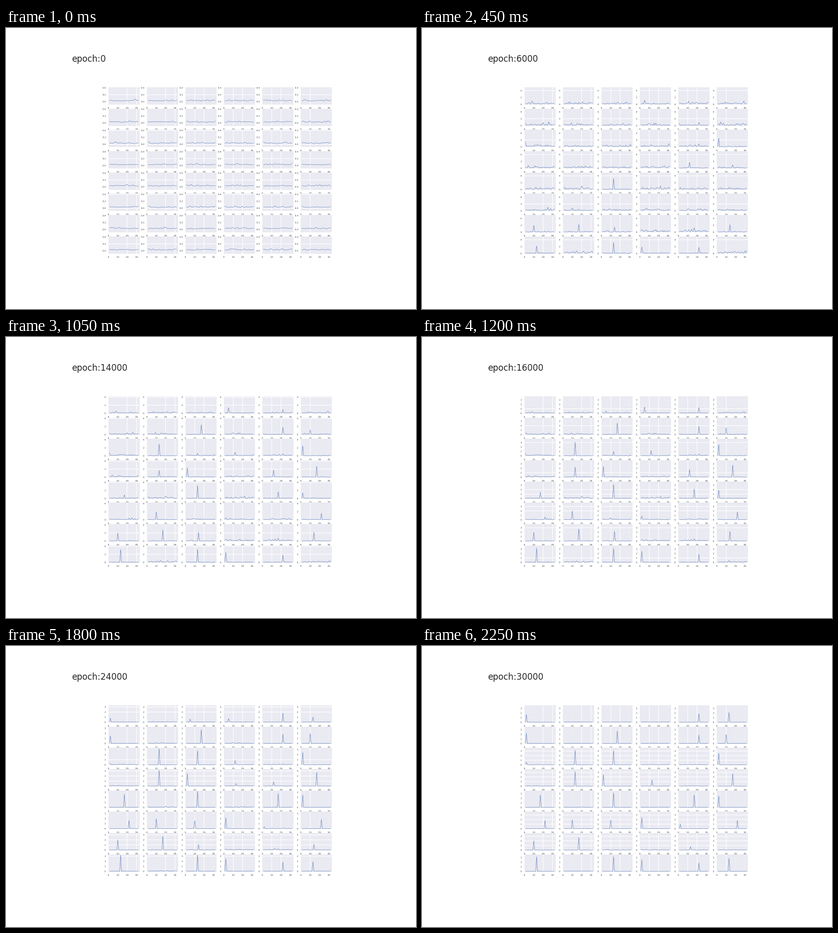
Recreate the animation shown at these times as a matplotlib script. Size 800 by 550 pixels, loop 2400 ms.

```python
import numpy as np
import matplotlib.pyplot as plt
from matplotlib.animation import FuncAnimation
from matplotlib.collections import LineCollection, PathCollection
from matplotlib.patches import Rectangle
from matplotlib.textpath import TextPath
from matplotlib.transforms import Affine2D

W, H, DPI = 800, 550, 100
ROWS, COLS, POINTS = 8, 6, 32
FRAMES, INTERVAL = 16, 150
INK, PANEL, BLUE = "#262626", "#EAEAF2", "#4C72B0"
PX = 72 / DPI

X0, DX, PW = 200, 75.07, 61
BOTTOM, DY, PH = 150, 41.7, 34
UNIT_X = 1.82
Y_MIN = -.088

# Position, height, first and last onset, panels in the order they rise
MODES = [
    (2, 2.5, 0, 18, (17, 45, 20, 29, 33, 6, 0, 34, 12)),
    (5, 1.4, 2, 9, (3, 2)),
    (10, 2.0, 0, 10, (36, 31, 11, 32)),
    (12, 1.75, 1, 7, (22, 15)),
    (13, 3.2, -2, 18, (26, 44, 42, 13, 19, 14, 47, 5, 21, 40)),
    (14, 2.2, 0, 2.5, (41, 38)),
    (17, 2.75, 2, 8, (37, 23, 8, 28, 24)),
    (22, 1.85, 1, 9, (46, 10, 35, 4, 30)),
]
FADING = (5, 12, 14)

rng = np.random.default_rng(5)
raw = rng.gamma(1.6, 1, (ROWS * COLS, POINTS + 1))
calm = .014 + .009 * (raw[:, 1:] + raw[:, :-1]) / 1.6
rough = .25 + .75 * rng.gamma(1.5, 1 / 1.5, (ROWS * COLS, POINTS))
xs = np.arange(1, POINTS + 1) * UNIT_X


def spikes(i):
    v = np.zeros((ROWS * COLS, POINTS))
    for x, height, first, last, panels in MODES:
        fade = np.clip((15 - i) / 6, 0, 1) if x in FADING else 1
        onsets = np.linspace(first, last, len(panels))
        width = .4 + .12 * np.maximum(onsets, 0)
        rise = 1 / (1 + np.exp((onsets - i) / width))
        v[list(panels), x - 1] = height * fade * rise * min(i / 3, 1)
    return v


def values(i):
    peak = spikes(i)
    level = np.interp(i, (0, 3, 5, 8, 10, 15), (0, .3, .28, .13, .08, .045))
    damp = 1 + .8 * peak.max(axis=1, keepdims=True)
    start = np.interp(i, (0, 2), (1, 0))
    return np.maximum(start * calm + level * rough / damp, peak)


def y_axis(i):
    """Pixels per unit and the tick values."""
    scale = np.interp(i, (0, 1, 3, 5, 8, 10, 12, 15),
                      (67.5, 13, 6.72, 6.37, 8.7, 10.25, 9.9, 9))
    step = .2 if scale > 30 else 1 if scale > 8.4 else 2
    return scale, np.arange(0, PH / scale + Y_MIN, step)


def corners():
    for n in range(ROWS * COLS):
        r, c = divmod(n, COLS)
        yield X0 + DX * c, BOTTOM + DY * r


def is_sharp(p):
    return abs(p % 1 - .5) <= .21


def grid_lines(scale, ticks):
    """Lines on a pixel's centre show; the others show only where they cross."""
    segs = []
    for left, base in corners():
        top = round(base - PH)
        cols = [left + t * UNIT_X for t in (10, 20, 30)]
        rows = [base - (t - Y_MIN) * scale for t in ticks]
        rows = [y for y in rows if base - y > 2]
        segs += [[(x, top), (x, top + PH)] for x in cols if is_sharp(x)]
        segs += [[(left, y), (left + PW, y)] for y in rows if is_sharp(y)]
        for y in rows:
            if not is_sharp(y):
                segs += [[(x - .6, y), (x + .6, y)]
                         for x in cols if not is_sharp(x)]
    return segs


def tick_label(text, x, y, align):
    """Small text as an outline, centred on y."""
    path = TextPath((0, 0), text, size=40)
    box = path.get_extents()
    anchor = box.x1 if align == "right" else (box.x0 + box.x1) / 2
    move = Affine2D().translate(-anchor, -14.6).scale(.1, -.1).translate(x, y)
    return move.transform_path(path)


fig = plt.figure(figsize=(W / DPI, H / DPI), dpi=DPI, facecolor="white")
ax = fig.add_axes([0, 0, 1, 1])
ax.set_xlim(0, W)
ax.set_ylim(H, 0)
ax.axis("off")

x_paths = []
for left, base in corners():
    ax.add_patch(Rectangle((round(left), round(base - PH)), PW, PH, fc=PANEL,
                           lw=0, zorder=2))
    x_paths += [tick_label(str(t), left + t * UNIT_X, base + 6.3, "center")
                for t in (0, 10, 20, 30)]

x_labels = PathCollection(x_paths, fc=INK, lw=0, zorder=1)
y_labels = PathCollection([], fc=INK, lw=0, zorder=5)
grid = LineCollection([], colors="white", linewidths=1.1 * PX, zorder=3)
curves = LineCollection([], colors=BLUE, linewidths=.42, zorder=4)
for layer in (x_labels, y_labels, grid, curves):
    layer.set_snap(False)
    ax.add_collection(layer, autolim=False)
title = ax.text(128, 66, "", fontsize=12, color=INK, family="DejaVu Sans")


def draw(i):
    scale, ticks = y_axis(i)
    form = "{:.1f}" if ticks[1] < 1 else "{:.0f}"
    lines, labels = [], []
    for (left, base), v in zip(corners(), values(i)):
        ys = np.maximum(base - (v - Y_MIN) * scale, base - PH)
        lines.append(np.column_stack((left + xs, ys)))
        labels += [tick_label(form.format(t), left - 5.5,
                              base - (t - Y_MIN) * scale, "right")
                   for t in ticks]
    curves.set_segments(lines)
    grid.set_segments(grid_lines(scale, ticks))
    y_labels.set_paths(labels)
    title.set_text(f"epoch:{2000 * i}")
    return [curves, grid, y_labels, title]


anim = FuncAnimation(fig, draw, frames=FRAMES, interval=INTERVAL,
                     repeat=True, repeat_delay=0, blit=False)
plt.show()
```
